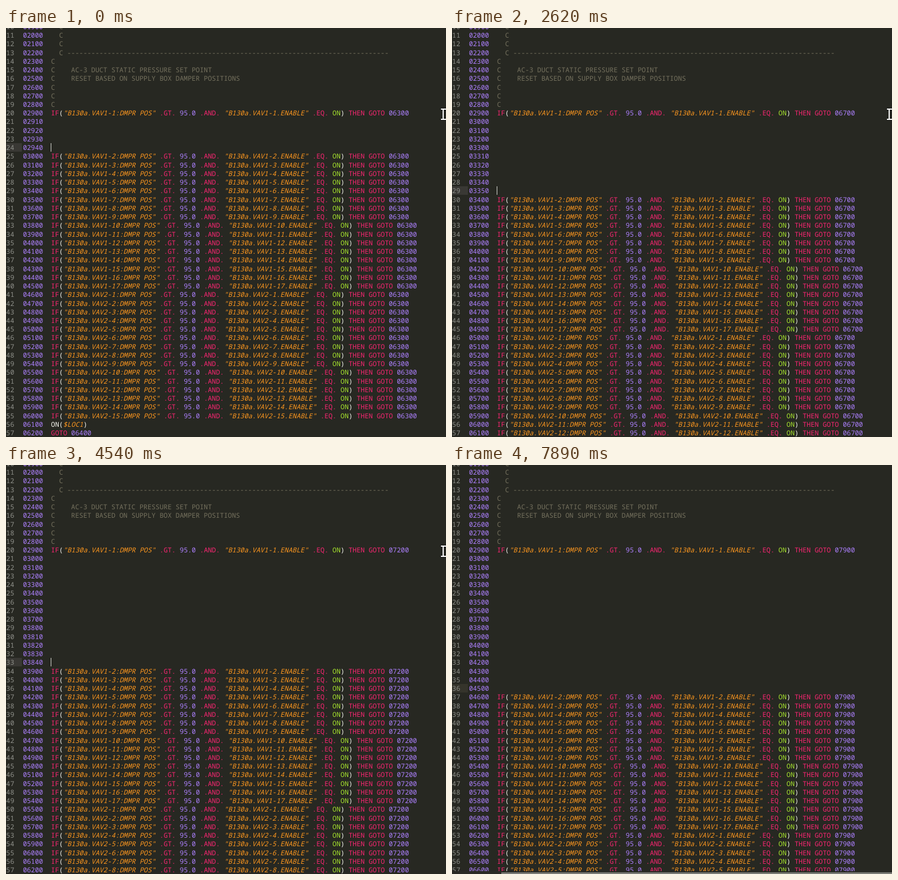
An HTML page with a canvas for the animation above (7990 ms loop, 777 by 721 pixels).

```html
<!DOCTYPE html>
<html lang="en">
<head>
<meta charset="utf-8">
<title>Line renumbering</title>
<style>
html, body { margin: 0; width: 100%; height: 100%; overflow: hidden; background: #272822; }
canvas { display: block; }
</style>
</head>
<body>
<canvas id="stage" width="777" height="721"></canvas>
<script>
const ctx = document.getElementById('stage').getContext('2d');
const W = 777, H = 721, LOOP = 7990;
const CELL = 7.1, ROW = 15.24, CODE_X = 79.6;
const FONT = `${CELL / 0.6}px "Noto Sans Mono", "DejaVu Sans Mono", monospace`;
const INK = {
  back: '#272822', gutter: '#8f908a', comment: '#75715e', key: '#f92672',
  num: '#ae81ff', str: '#fd971f', on: '#a6e22e', plain: '#f8f8f2'
};

// Each step changes some of: blank lines, renumbered lines, caret, scroll bar, mouse.
const steps = [
  { at: 0, blank: 4, done: 0, caret: 0.85, bar: 0, mouse: 1 },
  { at: 410, caret: 0.4 },
  { at: 550, caret: 0 },
  { at: 1080, done: 4, bar: 1 },
  { at: 1510, caret: 0.85, bar: 0.4 },
  { at: 1650, bar: 0 },
  { at: 1860, blank: 5 },
  { at: 2040, blank: 6 },
  { at: 2350, blank: 7 },
  { at: 2480, blank: 8 },
  { at: 2620, blank: 9 },
  { at: 3010, caret: 0 },
  { at: 3310, done: 9, bar: 1 },
  { at: 3590, caret: 0.85, bar: 0 },
  { at: 3990, blank: 10 },
  { at: 4270, blank: 11 },
  { at: 4400, blank: 12 },
  { at: 4540, blank: 13 },
  { at: 4690, blank: 14 },
  { at: 4830, blank: 15 },
  { at: 4970, blank: 16 },
  { at: 5370, caret: 0.15 },
  { at: 5790, done: 16, caret: 0, bar: 1 },
  { at: 6780, mouse: 0 }
];
const states = [];
steps.forEach((s, i) => states.push({ ...states[i - 1], ...s }));

const boxes = [];
for (let i = 2; i <= 17; i++) boxes.push('VAV1-' + i);
for (let i = 1; i <= 15; i++) boxes.push('VAV2-' + i);

const pad = n => String(n).padStart(5, '0');
const rowTop = n => 203.2 + (n - 24) * ROW;

function rule(box, target) {
  return [
    ['key', 'IF'], ['plain', '('], ['str', `"B130a.${box}:DMPR POS"`],
    ['key', ' .GT.'], ['num', ' 95.0'], ['key', ' .AND. '],
    ['str', `"B130a.${box}.ENABLE"`], ['key', ' .EQ. '], ['on', 'ON'],
    ['plain', ')'], ['key', ' THEN GOTO '], ['num', pad(target)]
  ];
}

function header(n) {
  if (n < 13) return '  C';
  if (n === 13) return '  C ' + '-'.repeat(80);
  if (n === 15) return 'C    AC-3 DUCT STATIC PRESSURE SET POINT';
  if (n === 16) return 'C    RESET BASED ON SUPPLY BOX DAMPER POSITIONS';
  return 'C';
}

// Returns the statement number and coloured parts of an editor line.
function lineAt(n, s) {
  const first = 3000 + s.done * 100;
  if (n < 20) return [n * 100 + 900, [['comment', header(n)]]];
  if (n === 20) return [2900, rule('VAV1-1', first + 3300)];
  const i = n - 20;
  if (i <= s.blank) {
    const extra = Math.max(0, i - s.done);
    return [2900 + (i - extra) * 100 + extra * 10, []];
  }
  const k = i - s.blank - 1, number = first + k * 100;
  if (k < boxes.length) return [number, rule(boxes[k], first + 3300)];
  if (k === boxes.length) {
    return [number, [['plain', 'ON('], ['str', '$LOC1'], ['plain', ')']]];
  }
  return [number, [['key', 'GOTO '], ['num', pad(first + 3400)]]];
}

function text(str, x, y, kind) {
  ctx.font = (kind === 'str' ? 'italic ' : '') + FONT;
  ctx.fillStyle = INK[kind];
  ctx.fillText(str, x, y);
}

function fill(color, x, y, w, h, alpha = 1) {
  ctx.globalAlpha = alpha;
  ctx.fillStyle = color;
  ctx.fillRect(x, y, w, h);
  ctx.globalAlpha = 1;
}

function drawMouse() {
  fill('#111', 767, 141, 10, 4, 0.5);
  fill('#111', 767, 160, 10, 3, 0.5);
  fill('#fff', 768, 142, 9, 2);
  fill('#fff', 771, 142, 2, 20);
  fill('#fff', 768, 160, 9, 2);
}

function draw(s) {
  fill(INK.back, 0, 0, W, H);
  const current = 20 + s.blank;
  const top = Math.round(rowTop(current));
  fill(s.bar ? '#35342b' : '#393834', 0, top, 28, 15);

  for (let n = 10; n <= 57; n++) {
    const y = rowTop(n) + 12;
    const [number, parts] = lineAt(n, s);
    text(String(n), 0.3, y, 'gutter');
    text(pad(number), CODE_X - 7 * CELL, y, 'num');
    let col = 0;
    for (const [kind, str] of parts) {
      text(str, CODE_X + col * CELL, y, kind);
      col += str.length;
    }
  }

  if (s.caret) fill(INK.plain, 79, top, 1, 15, s.caret);
  if (s.bar) {
    fill('#292a24', 0, 716, W, 5, s.bar);
    fill('#777872', 87, 718, W - 87, 3, s.bar);
  }
  if (s.mouse) drawMouse();
}

ctx.textBaseline = 'alphabetic';
ctx.textRendering = 'geometricPrecision';
let shown = -1;

function tick() {
  const t = performance.now() % LOOP;
  const i = states.findLastIndex(s => s.at <= t);
  if (i !== shown) draw(states[shown = i]);
  requestAnimationFrame(tick);
}
tick();
</script>
</body>
</html>
```
